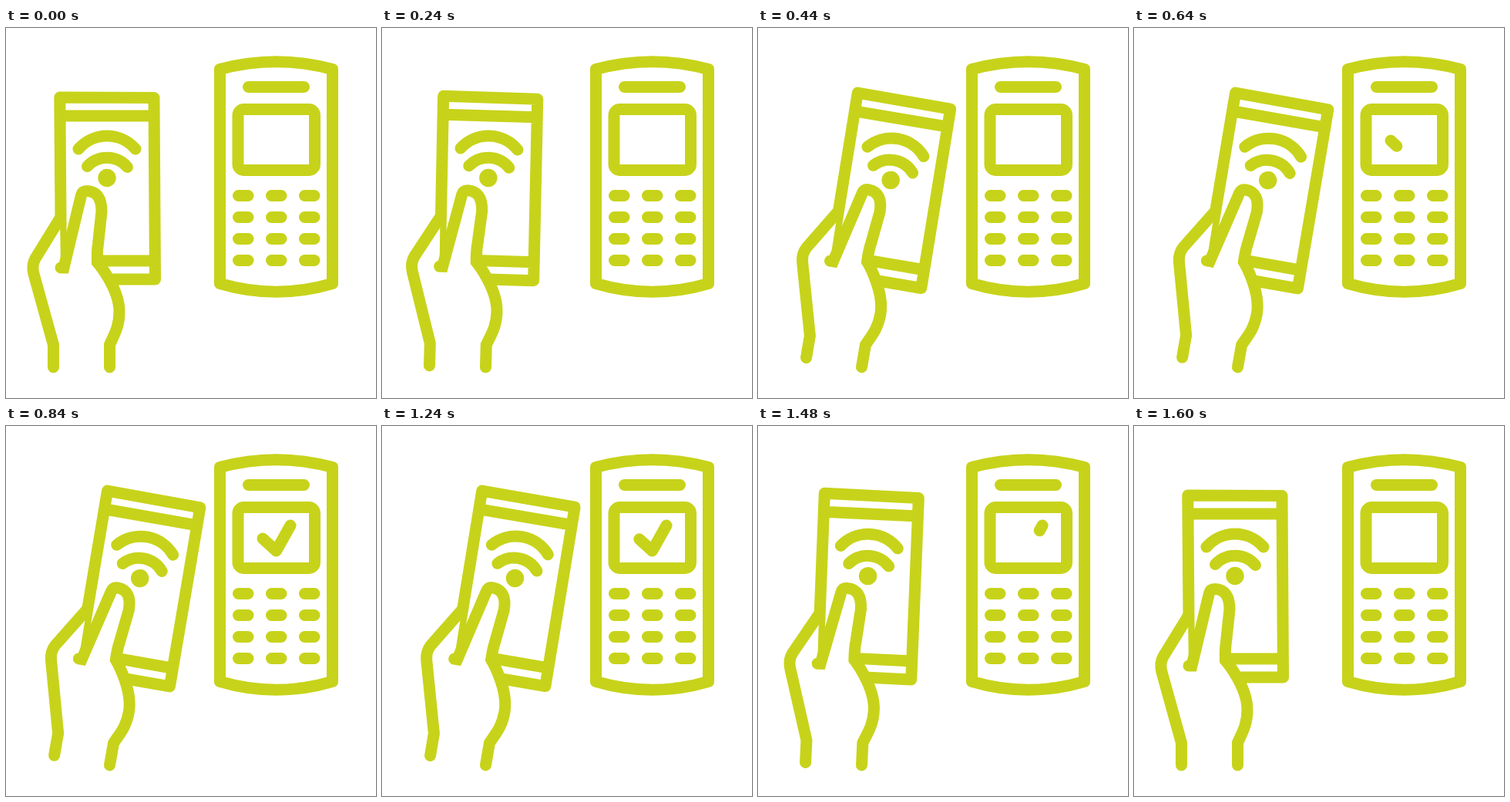
Recreate the animation shown at these times as an HTML page. Size 480 by 480 pixels, loop 2000 ms.

```html
<!DOCTYPE html>
<html lang="en">
<head>
<meta charset="utf-8">
<title>Contactless payment</title>
<style>
  html, body { margin: 0; width: 100%; height: 100%; overflow: hidden; background: #fff; }
  svg { display: block; width: 100%; height: 100%; }
  .line { fill: none; stroke: #c7d31a; stroke-width: 15; stroke-linecap: round; stroke-linejoin: round; }
  .dot { fill: #c7d31a; stroke: none; }
  .skin { fill: #fff; stroke: none; }
  .miter { stroke-linejoin: miter; }
</style>
</head>
<body>
<svg viewBox="0 0 480 480">
  <g class="line">
    <path d="M277.5 53.5Q350.5 34 423.5 53.5V331.5Q350.5 353 277.5 331.5Z"/>
    <path d="M314.5 76.5H386.5"/>
    <rect x="301" y="105.5" width="99.5" height="79" rx="7.5"/>
    <path id="keys"/>
    <path id="tick"/>
  </g>
  <g id="hand" class="line">
    <path d="M71.5 311L69.8 90L192 90.5L193.5 326H118M70 114H192M118 302H193"/>
    <path d="M94 157A48.8 48.8 0 0 1 168 157M105.5 179.5A34.7 34.7 0 0 1 157.5 180.5"/>
    <circle class="dot" cx="131" cy="194.5" r="11.7"/>
    <path class="skin" d="M70 247L38 299Q33 308 36 319L61.5 411V440H134.5V411C140 398 147 388 147 368C147 337 118.5 304 118.5 304Q118 290 119.5 280L124 238Q124 212 105 211.5Q99 211.5 97.5 217L75 311H71Z"/>
    <path d="M70 247L38 299Q33 308 36 319L61.5 411V440"/>
    <path class="miter" d="M71 311H75L97.5 217Q99 211.5 105 211.5Q124 212 124 238L119.5 280Q118 290 118.5 304C118.5 304 147 337 147 368C147 388 140 398 134.5 411V440"/>
  </g>
</svg>
<script>
  const LOOP = 2000, STEP = 40, TILT = 10;
  const PIVOT = [134.5, 440];
  const TICK = [[333, 146], [350.5, 162], [369, 129]];
  const hand = document.getElementById('hand');
  const tick = document.getElementById('tick');

  const progress = (t, start, length) => Math.min(1, Math.max(0, (t - start) / length));

  document.getElementById('keys').setAttribute('d',
    [217.5, 245.5, 273.5, 301.5].flatMap(y =>
      [301.5, 344.5, 387.5].map(x => `M${x} ${y}h12.5`)).join(''));

  const [a, b, c] = TICK;
  const firstLength = Math.hypot(b[0] - a[0], b[1] - a[1]);
  const bend = firstLength / (firstLength + Math.hypot(c[0] - b[0], c[1] - b[1]));

  function pointAt(f) {
    const [p, q, k] = f < bend ? [a, b, f / bend] : [b, c, (f - bend) / (1 - bend)];
    return p.map((v, i) => v + (q[i] - v) * k);
  }

  function tickPath(from, to) {
    const points = [pointAt(from), pointAt(to)];
    if (from < bend && to > bend) points.splice(1, 0, b);
    return 'M' + points.map(p => p.join(' ')).join('L');
  }

  function draw(now) {
    const t = Math.floor((now % LOOP) / STEP) * STEP;
    const angle = TILT * (progress(t, 200, 249) - progress(t, 1230, 342));
    hand.setAttribute('transform', `rotate(${angle} ${PIVOT})`);

    const drawn = progress(t, 600, 230);
    const erased = progress(t, 1235, 280);
    const visible = t >= 600 && erased < 1;
    tick.setAttribute('d', visible ? tickPath(erased, drawn) : '');
  }

  const start = performance.now();
  function frame() {
    draw(performance.now() - start);
    requestAnimationFrame(frame);
  }
  frame();
</script>
</body>
</html>
```
